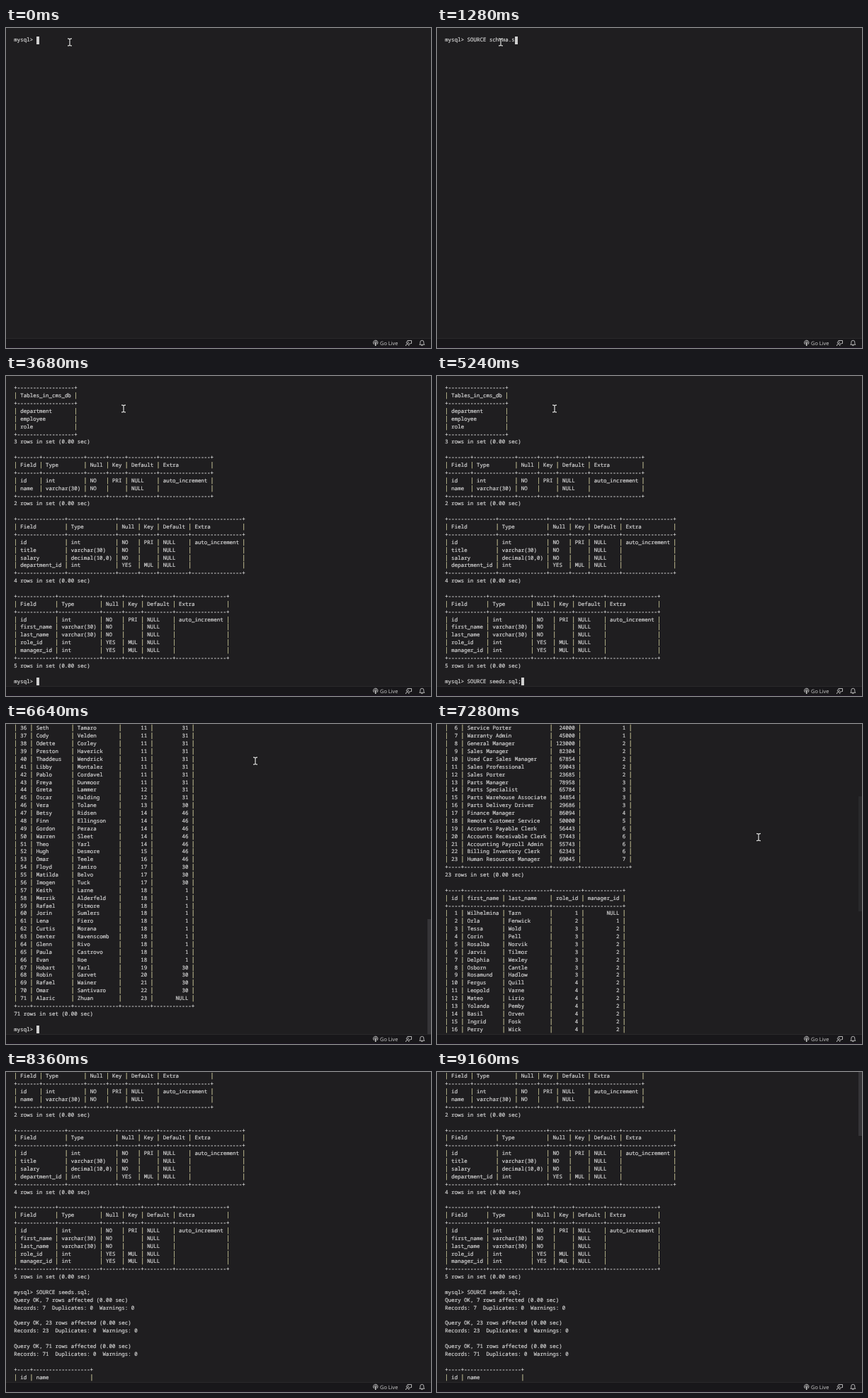
Recreate the animation shown at these times as an HTML page. Size 600 by 451 pixels, loop 9.52 s.

```html
<!DOCTYPE html>
<html lang="en">
<head>
<meta charset="utf-8">
<title>Terminal session</title>
<style>
  html, body { margin: 0; width: 100%; height: 100%; overflow: hidden; background: #1f1e20; }
  #stage { position: relative; width: 600px; height: 451px; overflow: hidden; }
  #screen {
    position: absolute; left: 11.3px; top: -9.4px; margin: 0; color: #d4d4d4;
    font: 7.463px/10.868px "Noto Sans Mono", monospace; text-rendering: geometricPrecision;
    -webkit-text-stroke: .2px;
  }
  /* Table bars are taller than the letters but keep the cell width. */
  #screen i { font-style: normal; font-size: 1.2em; line-height: 0; margin: 0 -.05em; color: #cfcb9c; }
  #screen b { background: #d0d0d0; padding: .6px 0; }
  #thumb { position: absolute; left: 595px; width: 5px; height: 162px; background: #353437; }
  #status {
    position: absolute; top: 437px; width: 600px; height: 14px; box-sizing: border-box;
    background: #18171a; border-top: 1px solid #29282a; border-bottom: 1px solid #1c1424;
  }
  svg { position: absolute; left: 0; top: 0; }
  svg text { font: 7.4px "Open Sans", sans-serif; fill: #d0d0d0; text-rendering: geometricPrecision; }
</style>
</head>
<body>
<div id="stage">
  <pre id="screen"></pre>
  <div id="thumb"></div>
  <div id="status"></div>
  <svg width="600" height="451" fill="none" stroke="#c8c8c8" stroke-width=".9">
    <defs><path id="beam" d="M-2.5-5Q0-5 0-3.8Q0-5 2.5-5M0-4V4M-2.5 5Q0 5 0 3.8Q0 5 2.5 5"/></defs>
    <g id="broadcast">
      <path d="M519.8 446A3.2 3.2 0 1 1 523.6 446M520.4 444.3A1.6 1.6 0 1 1 523 444.3"/>
      <path d="M521.7 443.2V448" stroke-width="1.6"/>
    </g>
    <text x="528" y="446.7" stroke="none">Go Live</text>
    <g id="feedback">
      <path d="M566.5 440.5H572.5V444.5H571L569.5 446V444.5"/>
      <circle cx="566.7" cy="443.3" r="1.4"/>
      <path d="M564.3 448Q564.4 445.6 566.7 445.6T569 448"/>
    </g>
    <path id="bell" d="M583.8 446.3H590.8L589.8 444.7V442.8A2.5 2.5 0 0 0 584.8 442.8V444.7ZM586.3 446.6A1 1 0 0 0 588.3 446.6"/>
    <g id="mouse" stroke-linecap="round">
      <use href="#beam" stroke="#111" stroke-width="2.6"/>
      <use href="#beam" stroke="#d8d8d8" stroke-width="1.3"/>
    </g>
  </svg>
</div>
<script>
const LOOP = 9520, TICK = 40, ROWS = 41, PAGE = 39;
const PROMPT = 'mysql> ';

// Formats rows the way the MySQL client prints a result set.
function table(headers, rows) {
  const widths = headers.map((h, c) => Math.max(h.length, ...rows.map(r => String(r[c]).length)));
  const rule = '+' + widths.map(w => '-'.repeat(w + 2)).join('+') + '+';
  const line = (cells, pad) => '| ' + cells.map((v, c) => pad(String(v), c)).join(' | ') + ' |';
  const left = (v, c) => v.padEnd(widths[c]);
  const aligned = (v, c) => /id$|salary/.test(headers[c]) ? v.padStart(widths[c]) : left(v, c);
  return [rule, line(headers, left), rule, ...rows.map(r => line(r, aligned)), rule,
    `${rows.length} rows in set (0.00 sec)`, ''];
}

const describe = (...fields) => table(['Field', 'Type', 'Null', 'Key', 'Default', 'Extra'],
  fields.map(f => {
    const [name, type, nullable = 'NO', key = '', extra = ''] = f.split('/');
    return [name, type, nullable, key, 'NULL', extra];
  }));

const affected = n => `Query OK, ${n} row${n === 1 ? '' : 's'} affected (0.00 sec)`;
const inserted = list => [affected(list.length),
  `Records: ${list.length}  Duplicates: 0  Warnings: 0`, ''];

// Each line reads "heading: item, item"; ids follow the order of the lines and items.
const parse = text => text.split('\n').map(line => {
  const [heading, items] = line.split(': ');
  return { heading, items: items.split(', ') };
});
const numbered = rows => rows.map((r, i) => [i + 1, ...r]);

const offices = parse(`Service: Service Director 96000, Service Manager 84000, Service Consultant 45000, Technician 59904, Service Cashier 32000, Service Porter 24000, Warranty Admin 45000
Sales: General Manager 123000, Sales Manager 82304, Used Car Sales Manager 67854, Sales Professional 59043, Sales Porter 23685
Parts: Parts Manager 78958, Parts Specialist 65784, Parts Warehouse Associate 34854, Parts Delivery Driver 29686
Finance: Finance Manager 86094
Customer Service: Remote Customer Service 50000
Accounting: Accounts Payable Clerk 56443, Accounts Receivable Clerk 57443, Accounting Payroll Admin 55743, Billing Inventory Clerk 62343
Human Resources: Human Resources Manager 69045`);

// One line per role, headed by the id of its manager.
const teams = parse(`NULL: Wilhelmina Tarn
1: Orla Fenwick
2: Tessa Wold, Corin Pell, Rosalba Norvik, Jarvis Tilmor, Delphia Wexley, Osborn Cantle, Rosamund Hadlow
2: Fergus Quill, Leopold Varne, Mateo Lirio, Yolanda Pemby, Basil Orven, Ingrid Fosk, Perry Wick, Hester Ludlam, Milo Featherstowe, Edwin Sorley, Nadia Brimley
2: Casper Wray, Lottie Marden, Hugo Tennet, Selma Oakby
2: Victor Rennick, Thora Gadsby, Otis Carrow
2: Mabel Twine, Rufus Penhale
NULL: Stella Morwen
30: Gareth Elsby
30: Wanda Colter
31: Silas Burrage, Edith Lomax, Jonas Pickley, Seth Tamaro, Cody Velden, Odette Corley, Preston Haverick, Thaddeus Wendrick, Libby Montalez, Pablo Cordavel, Freya Dunmoor
31: Greta Lammer, Oscar Halding
30: Vera Tolane
46: Betsy Ridsen, Finn Ellingson, Gordon Peraza, Warren Sleet, Theo Yarl
46: Hugh Desmore
46: Omar Teele
30: Floyd Zamiro, Matilda Belvo, Imogen Tuck
1: Keith Larne, Merrik Alderfeld, Rafael Pitmore, Jorin Sumlers, Lena Fiero, Curtis Morana, Dexter Ravenscomb, Glenn Rivo, Paula Castrovo, Evan Roe
30: Hobart Yarl
30: Robin Garvet
30: Rafael Wainer
30: Omar Santivaro
NULL: Alaric Zhuan`);

const departments = numbered(offices.map(o => [o.heading]));
const roles = numbered(offices.flatMap((o, i) => o.items.map(item => {
  const [, title, salary] = item.match(/(.+) (\d+)/);
  return [title, salary, i + 1];
})));
const staff = numbered(teams.flatMap((team, i) =>
  team.items.map(name => [...name.split(' '), i + 1, team.heading])));

const intro = ["Type 'help;' or '\\h' for help. Type '\\c' to clear the current input statement.", ''];
const created = [affected(3), '', affected(1), '', 'Database changed',
  ...[1, 2, 3].flatMap(() => [affected(0), ''])];
const schema = [
  ...created,
  ...table(['Tables_in_cms_db'], [['department'], ['employee'], ['role']]),
  ...describe('id/int/NO/PRI/auto_increment', 'name/varchar(30)'),
  ...describe('id/int/NO/PRI/auto_increment', 'title/varchar(30)', 'salary/decimal(10,0)',
    'department_id/int/YES/MUL'),
  ...describe('id/int/NO/PRI/auto_increment', 'first_name/varchar(30)', 'last_name/varchar(30)',
    'role_id/int/YES/MUL', 'manager_id/int/YES/MUL'),
];
const seeds = [
  ...[departments, roles, staff].flatMap(inserted),
  ...table(['id', 'name'], departments),
  ...table(['id', 'title', 'salary', 'department_id'], roles),
  ...table(['id', 'first_name', 'last_name', 'role_id', 'manager_id'], staff),
];

// Each command is typed, then run: its first lines trickle out, the rest arrives at once.
const commands = [
  { text: 'SOURCE schema.sql;', type: 520, typed: 1400, run: 1480, done: 1960, slow: created.length, output: schema },
  { text: 'SOURCE seeds.sql;', type: 4120, typed: 5240, run: 6040, done: 6160, slow: 9, output: seeds },
];

const progress = (t, from, to) => Math.min(1, Math.max(0, (t - from) / (to - from)));
const part = (list, p) => list.slice(0, Math.floor(list.length * p + 1e-6));

function bufferAt(t) {
  const buffer = [...intro];
  for (const c of commands) {
    if (t < c.run) return [...buffer, PROMPT + part([...c.text], progress(t, c.type, c.typed)).join('')];
    buffer.push(PROMPT + c.text);
    if (t < c.done) return [...buffer, ...part(c.output.slice(0, c.slow), progress(t, c.run, c.done)), ''];
    buffer.push(...c.output);
  }
  return [...buffer, PROMPT];
}

// Scroll stops: time, lines back from the bottom.
const scroll = [[0, 0], [7240, 59], [7800, 100], [8120, 109], [8280, 118]];

// Mouse moves: start, end, x, y.
const moves = [[0, 1, 90, 20], [3040, 3360, 166, 46], [6040, 6640, 352, 52], [6640, 7080, 454, 159.5]];

const pointerAt = t => moves.reduce(([x, y], [from, to, toX, toY]) => {
  const p = progress(t, from, to);
  return [x + (toX - x) * p, y + (toY - y) * p];
}, [90, 20]);

const [screen, thumb, mouse] = ['screen', 'thumb', 'mouse'].map(id => document.getElementById(id));
let lastTick = -1;

function draw(t) {
  const buffer = bufferAt(t);
  const back = scroll.findLast(s => s[0] <= t)[1];
  const top = Math.max(1, buffer.length - 1 - PAGE) - back;
  buffer[buffer.length - 1] += '<b> </b>';
  screen.innerHTML = buffer.slice(top - 1, top - 1 + ROWS).join('\n').replace(/\|/g, '<i>|</i>');

  const settled = t < 7240 || t >= 8680;
  thumb.style.top = 275 - back * 2.94 + 'px';
  thumb.style.opacity = t < 6160 ? 0 : settled ? 1 : t < 7880 ? .5 : 0;

  mouse.setAttribute('transform', `translate(${pointerAt(t)})`);
  mouse.setAttribute('visibility', t < 8280 ? 'visible' : 'hidden');
}

function frame() {
  const tick = Math.floor(performance.now() % LOOP / TICK);
  if (tick !== lastTick) draw((lastTick = tick) * TICK);
  requestAnimationFrame(frame);
}
frame();
</script>
</body>
</html>
```
